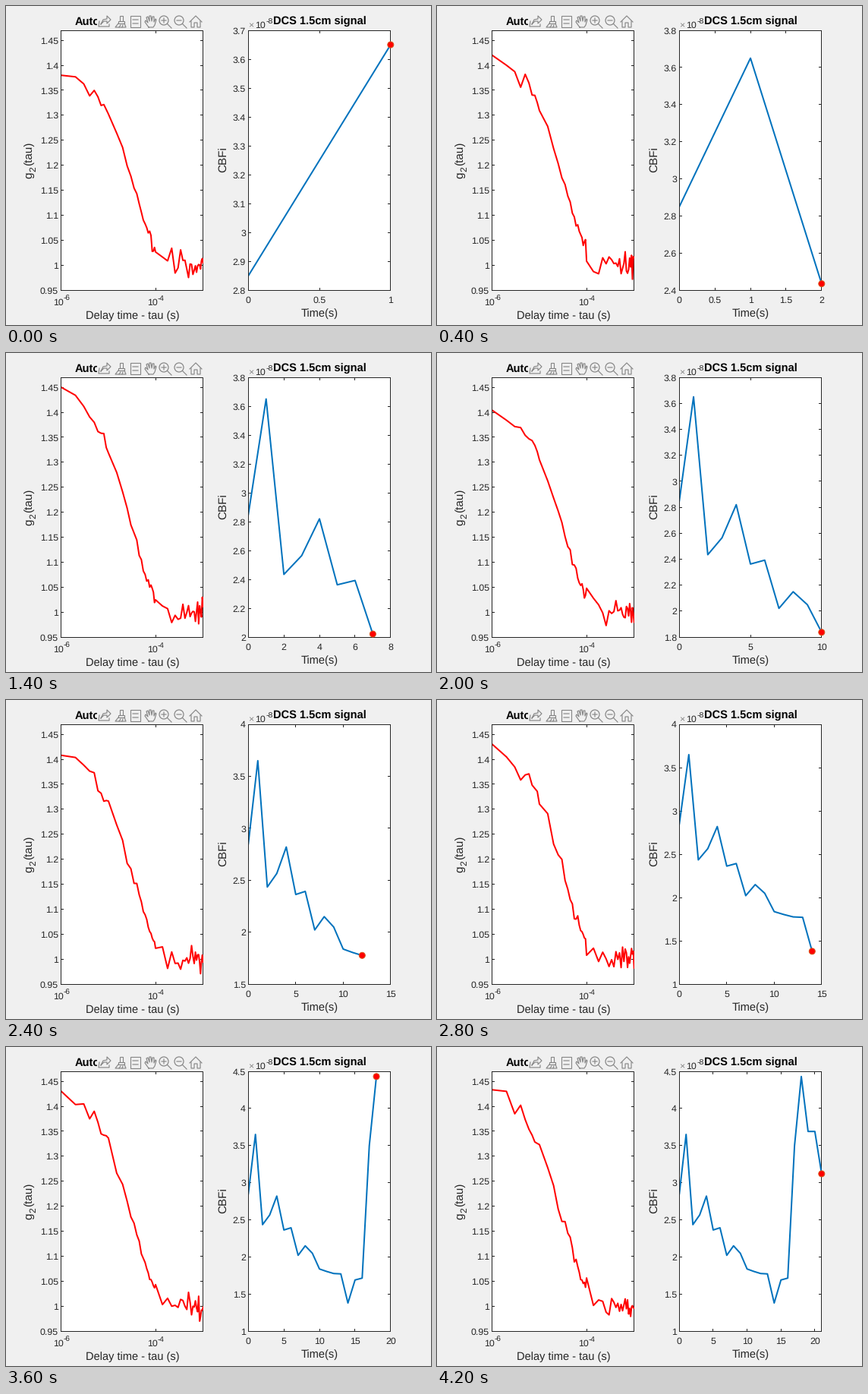
Recreate the animation shown at these times as a matplotlib script. Size 560 by 420 pixels, loop 4.4 s.

```python
import matplotlib.pyplot as plt
import numpy as np
from matplotlib.animation import FuncAnimation
from matplotlib.patches import Circle, Rectangle

W, H, DPI = 560, 420, 100
PT = 72 / DPI                      # points per pixel
BG, INK, GREY = "#f0f0f0", "#262626", "#858585"
RED, BLUE, ORANGE = "#ff0000", "#0072bd", "#d95319"
TOP, BOTTOM = 32, 374.2
LEFT_X, RIGHT_X = (72.8, 259.2), (319.3, 506.8)
G_RANGE = (0.95, 1.47)

plt.rcParams.update({"font.family": "Liberation Sans",
                     "text.hinting": "no_hinting"})

# Blood flow index, one sample per second, in 1e-8
FLOW = np.array([2.85, 3.65, 2.435, 2.565, 2.82, 2.363, 2.393, 2.022,
                 2.15, 2.05, 1.838, 1.805, 1.777, 1.772, 1.38, 1.69,
                 1.715, 3.497, 4.43, 3.69, 3.69, 3.12])

# Height of the correlation curve at its left end, from second 1 on
START = [1.38, 1.42, 1.43, 1.44, 1.437, 1.42, 1.45, 1.43, 1.432, 1.404, 1.40,
         1.408, 1.455, 1.43, 1.457, 1.40, 1.47, 1.43, 1.40, 1.405, 1.433]

# Lag times in microseconds: three linear stretches
TAU = np.r_[np.arange(1, 10), np.arange(10, 100, 5), np.arange(100, 1021, 40)]


def decay(n):
    """Stretched exponential with its start lifted, plus seeded noise."""
    g = 1 + 0.43 * np.exp(-(TAU / 35) ** 0.9)
    g += (START[n - 1] - g[0]) * np.exp(-(TAU - 1) / 8)
    sigma = np.select([TAU == 1, TAU < 10, TAU < 100], [0, 0.009, 0.007], 0.015)
    return g + sigma * np.random.default_rng(n).normal(size=TAU.size)


fig = plt.figure(figsize=(W / DPI, H / DPI), dpi=DPI, facecolor=BG)
ax = fig.add_axes([0, 0, 1, 1])


def to_px(v, lo, hi, a, b):
    return a + (np.asarray(v) - lo) / (hi - lo) * (b - a)


def crisp(v):
    return np.floor(v) + 0.5


def text(x, y, s, px=12.4, color=INK, ha="center", **kw):
    ax.text(x, y, s, fontsize=px * PT, color=color, ha=ha, va="baseline", **kw)


def upright(x, y, s, px=15.2, ha="left"):
    text(x, y, s, px, ha=ha, rotation=90, rotation_mode="anchor")


def line(xs, ys, color, width=1, **kw):
    return ax.plot(xs, ys, color=color, lw=width * PT, snap=False, **kw)[0]


def panel(span, xticks, yticks):
    (x0, x1), y0, y1 = crisp(span), crisp(TOP), crisp(BOTTOM)
    box = ax.add_patch(Rectangle((x0, y0), x1 - x0, y1 - y0, fc="white",
                                 ec=INK, lw=PT, snap=False, zorder=1))
    for x in crisp(xticks):
        line([x, x], [y1, y1 - 3], INK)
        line([x, x], [y0, y0 + 3], INK)
    for y, label in yticks:
        text(x0 - 3.5, y + 4.5, label, ha="right")
        y = crisp(y)
        line([x0, x0 + 3], [y, y], INK)
        line([x1, x1 - 3], [y, y], INK)
    return box


def icon(*strokes):
    for pts in strokes:
        xs, ys = zip(*pts)
        line(xs, ys, GREY, 1.15, zorder=6)


def frame_box(x, y, w, h):
    ax.add_patch(Rectangle((x, y), w, h, fill=False, ec=GREY, lw=1.1 * PT,
                           zorder=6))


def toolbar():
    ax.add_patch(Rectangle((120, 9), 141, 22, fc=BG, ec="none", zorder=5))
    # share
    icon([(123, 20), (122, 27), (136, 27), (136, 24)],
         [(125, 24), (128, 18), (133, 17), (133, 13), (138, 18), (133, 23),
          (133, 20), (129, 20), (125, 24)])
    # brush
    frame_box(150, 13, 4, 7)
    frame_box(148, 20, 8, 3)
    icon([(148, 23), (144, 28), (158, 28), (156, 23)],
         [(149, 28), (151, 25)], [(153, 28), (154, 25)])
    # data tip
    frame_box(164, 13, 13, 15)
    icon([(167, 18), (174, 18)], [(167, 23), (174, 23)])
    # pan
    icon([(188, 28), (183, 21), (184, 19), (187, 22), (185, 15), (187, 14),
          (189, 20), (189, 13), (191, 13), (192, 20), (193, 14), (195, 14),
          (195, 21), (197, 17), (198, 18), (196, 25), (194, 28), (188, 28)])
    # zoom in, zoom out
    for x in (208, 228):
        ax.add_patch(Circle((x, 19), 6, fill=False, ec=GREY, lw=1.2 * PT,
                            zorder=6))
        icon([(x - 3, 19), (x + 3, 19)], [(x + 4.5, 23.5), (x + 10, 29)])
    icon([(208, 16), (208, 22)])
    # home
    icon([(242, 21), (250, 13), (258, 21)],
         [(244, 20), (244, 28), (248, 28), (248, 22), (252, 22), (252, 28),
          (256, 28), (256, 20)])


def draw_decay(n):
    levels = np.arange(0.95, 1.46, 0.05)
    ys = to_px(levels, *G_RANGE, BOTTOM, TOP)
    xticks = to_px([0, 2], 0, 3, *LEFT_X)
    box = panel(LEFT_X, xticks, [(y, f"{v:.3g}") for y, v in zip(ys, levels)])
    line(to_px(np.log10(TAU), 0, 3, *LEFT_X),
         to_px(decay(n), *G_RANGE, BOTTOM, TOP),
         RED, 2, zorder=3).set_clip_path(box)
    for x, exponent in zip(xticks, ("-6", "-4")):
        text(x - 11, 394, "10", ha="left")
        text(x + 2.5, 388, exponent, 10, ha="left")
    text(167, 412, "Delay time - tau (s)", 14.67)
    upright(34, 227, "g")
    upright(39, 218, "2", 12)
    upright(34, 210.5, "(tau)")
    text(90.5, 25, "Auto", 14.67, "black", ha="left", weight="bold")
    toolbar()


def draw_flow(n):
    flow = FLOW[:n + 1]
    end = next(e for e in (1, 2, 3, 4, 6, 8, 10, 11, 15, 20, 21) if e >= n)
    xstep = 0.5 if end <= 2 else 1 if end <= 4 else 2 if end <= 8 else 5
    ystep = 0.1 if n == 1 else 0.2 if flow.min() >= 1.8 else 0.5
    lo, hi = int(flow.min() // ystep), int(np.ceil(flow.max() / ystep))

    xvals = np.arange(0, end + 0.01, xstep)
    xticks = to_px(xvals, 0, end, *RIGHT_X)
    yticks = [(to_px(k, lo, hi, BOTTOM, TOP), f"{k * ystep:.3g}")
              for k in range(lo, hi + 1)]
    box = panel(RIGHT_X, xticks, yticks)
    for x, v in zip(xticks, xvals):
        text(x, 391, f"{v:g}")

    xs = to_px(np.arange(n + 1), 0, end, *RIGHT_X)
    ys = to_px(flow / ystep, lo, hi, BOTTOM, TOP)
    line(xs, ys, BLUE, 2, zorder=3).set_clip_path(box)
    ax.add_patch(Circle((xs[-1], ys[-1]), 4, fc=RED, ec=ORANGE, lw=PT,
                        zorder=4))

    text(319, 29, "×", color=GREY, ha="left")
    text(328.5, 29, "10", ha="left")
    text(342.5, 24, "-8", 10.5, ha="left")
    text(413, 25, "DCS 1.5cm signal", 14.67, "black", weight="bold")
    text(413, 409, "Time(s)", 14.67)
    upright(291.5, 202, "CBFi", ha="center")


def draw(frame):
    ax.clear()
    ax.set(xlim=(0, W), ylim=(H, 0))
    ax.axis("off")
    n = max(1, frame)
    draw_decay(n)
    draw_flow(n)
    return []


anim = FuncAnimation(fig, draw, frames=len(FLOW), interval=200, repeat=True,
                     repeat_delay=0, init_func=lambda: draw(0))
plt.show()
```
